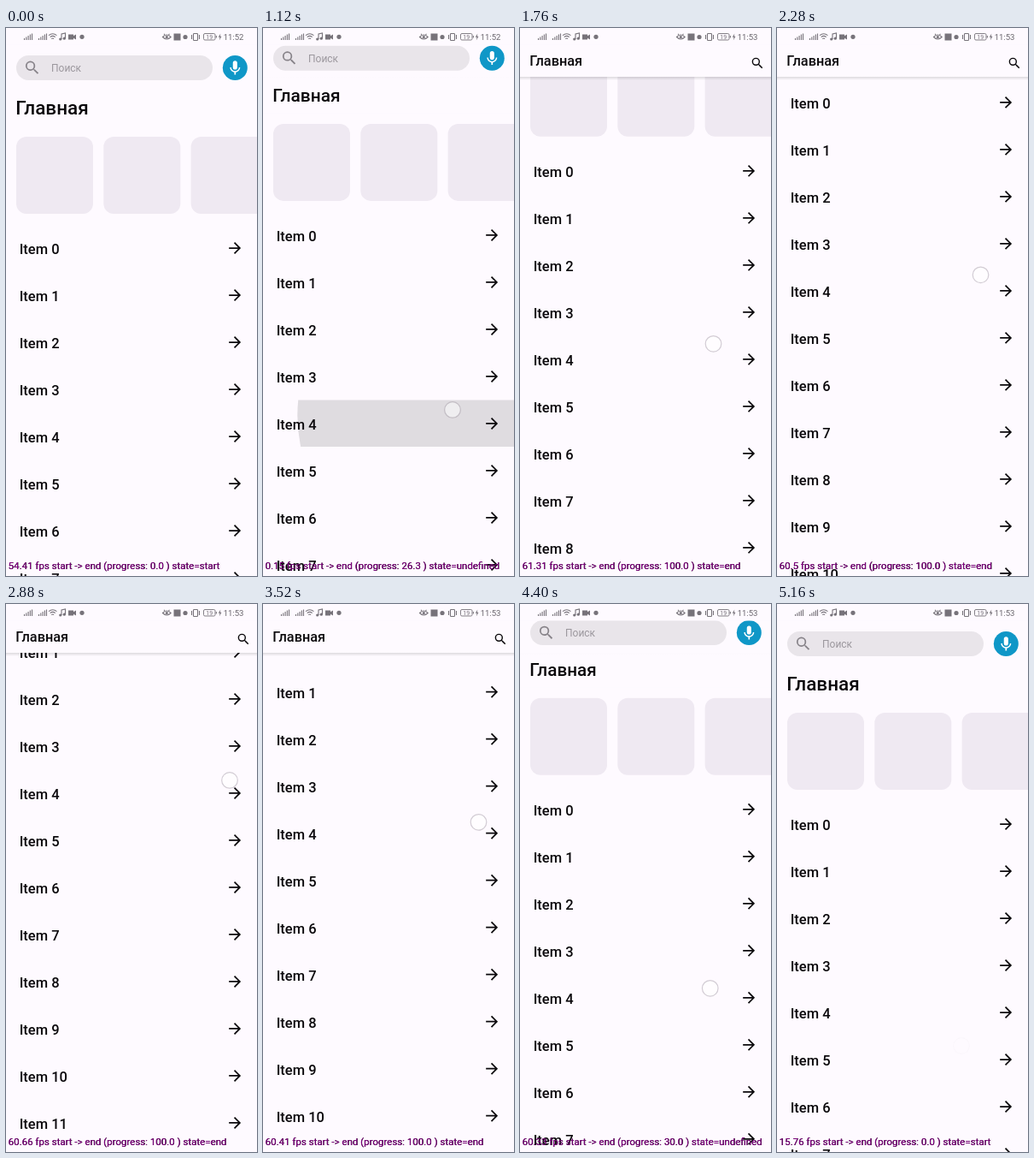
Recreate the animation shown at these times as an HTML page. Size 294 by 640 pixels, loop 5560 ms.

```html
<!DOCTYPE html>
<html lang="ru">
<head>
<meta charset="utf-8">
<style>
  html, body { margin: 0; width: 100%; height: 100%; overflow: hidden; background: #fefaff; }
  #stage { position: absolute; left: 0; top: 0; width: 294px; height: 640px; overflow: hidden; }
  svg { display: block; }
  text { font-family: Roboto, sans-serif; }
  .label { font-size: 16.5px; font-weight: 500; fill: #0b090c; }
  #title { font-size: 22.5px; font-weight: 500; fill: #0b090c; }
  #debug {
    position: absolute; left: 2.5px; top: 621px; line-height: 14px; white-space: pre;
    font: 11.5px/14px Roboto, sans-serif; color: #808; text-shadow: .3px .3px 0 #000;
  }
</style>
</head>
<body>
<div id="stage">
<svg width="294" height="640" viewBox="0 0 294 640">
  <defs>
    <path id="arrow" d="M12 4l-1.41 1.41L16.17 11H4v2h12.17l-5.58 5.59L12 20l8-8z"/>
    <path id="lens" d="M15.5 14h-.79l-.28-.27A6.47 6.47 0 0 0 16 9.5 6.5 6.5 0 1 0 9.5 16c1.61 0 3.09-.59 4.23-1.57l.27.28v.79l5 4.99L20.49 19zm-6 0a4.5 4.5 0 1 1 0-9 4.5 4.5 0 0 1 0 9z"/>
    <path id="signal" d="M.5 14v-2M2.8 14v-3.5M5.1 14V9M7.4 14V7.5M9.5 14V6.5"/>
    <clipPath id="row"><rect width="294" height="54.5"/></clipPath>
    <linearGradient id="shade" x2="0" y2="1">
      <stop stop-color="#000" stop-opacity=".13"/>
      <stop offset="1" stop-color="#000" stop-opacity="0"/>
    </linearGradient>
  </defs>

  <rect width="294" height="640" fill="#fefaff"/>
  <g id="list">
    <g fill="#efe9f2">
      <rect x="12" y="127" width="90" height="90" rx="12"/>
      <rect x="114.3" y="127" width="90" height="90" rx="12"/>
      <rect x="216.6" y="127" width="90" height="90" rx="12"/>
    </g>
    <g transform="translate(0 449.5)" clip-path="url(#row)">
      <circle id="ripple" cy="18" fill="#000"/>
    </g>
  </g>

  <rect id="header" width="294" fill="#fefaff"/>
  <rect id="shadow" y="57" width="294" height="4" fill="url(#shade)"/>
  <g id="search">
    <rect x="12" y="32" width="230" height="29" rx="14.5" fill="#e9e5ea"/>
    <use href="#lens" transform="translate(20.3 36) scale(.87)" fill="#878389"/>
    <text x="53" y="51" font-size="12" fill="#9b979d">Поиск</text>
    <circle cx="268.3" cy="46.5" r="14.5" fill="#0f97c7"/>
    <path transform="translate(258.1 36.6) scale(.85)" fill="#fff"
      d="M12 14a3 3 0 0 0 3-3V5a3 3 0 0 0-6 0v6a3 3 0 0 0 3 3zm5.3-3c0 3-2.54 5.1-5.3 5.1S6.7 14 6.7 11H5c0 3.41 2.72 6.23 6 6.72V21h2v-3.28c3.28-.48 6-3.3 6-6.72z"/>
  </g>
  <text id="title">Главная</text>
  <use id="find" href="#lens" transform="translate(269.5 32.5) scale(.72)" fill="#0b090c"/>

  <rect width="294" height="19.5" fill="#fefaff"/>
  <g fill="none" stroke="#77737a" stroke-width="1.1">
    <use href="#signal" x="21"/>
    <use href="#signal" x="38"/>
    <path d="M50 8.7q4.7-4 9.4 0M51.7 10.7q3-2.6 6 0M53.3 12.6q1.4-1.2 2.8 0"/>
    <path d="M65 13V7l4.5-1v6"/>
    <path d="M183.5 10.5q4.8-5 9.6 0q-4.8 5-9.6 0zM185 6.8l1 1M191.5 6.8l-1 1"/>
    <rect x="219.5" y="6.5" width="5" height="8" rx=".8"/>
    <path d="M217.5 8v5M226.5 8v5"/>
    <rect x="231.5" y="6.5" width="13.5" height="7.5" rx="1.5" stroke-width=".9"/>
    <path d="M246.3 9v2.6"/>
  </g>
  <g fill="#77737a">
    <circle cx="63.7" cy="13" r="1.6"/>
    <circle cx="68.3" cy="12.2" r="1.6"/>
    <path d="M73 7.5h6v1.7l3-1.7v6l-3-1.7v1.7h-6z"/>
    <circle cx="89" cy="10.3" r="2.6"/>
    <circle cx="188.3" cy="10.5" r="1.6"/>
    <rect x="196.5" y="6.5" width="8" height="8"/>
    <circle cx="210" cy="10.5" r="2.6"/>
    <path d="M251.3 6.5l-2.5 4.3h1.7l-.6 3.5 2.6-4.5h-1.7z"/>
    <text x="238.2" y="13" font-size="7" text-anchor="middle">19</text>
    <text id="clock" x="254.7" y="14" font-size="9.5" fill="#68646b"></text>
  </g>
</svg>
<div id="debug"></div>
<svg width="294" height="640" style="position:absolute;left:0;top:0">
  <circle id="touch" r="9.3" fill="#fff" fill-opacity=".5" stroke="#786e7d" stroke-opacity=".33" stroke-width="1.2"/>
</svg>
</div>

<script>
const LOOP = 5560, COLLAPSE = 57.4;
const $ = id => document.getElementById(id);
const clamp = (v, a = 0, b = 1) => Math.min(b, Math.max(a, v));
const lerp = (a, b, k) => a + (b - a) * k;
const ramp = (t, a, b) => clamp((t - a) / (b - a));

// One long drag: time, finger x, finger y, scroll
const drag = [
  [920, 222, 464, 0], [1000, 222, 461, 0], [1120, 222, 446, 15],
  [1760, 226.5, 369, 90], [2280, 238.5, 288.5, 170], [2880, 262, 206, 256],
  [3180, 264, 179, 284], [3680, 245, 301, 164], [4000, 231.5, 370.5, 96],
  [4500, 221, 466, 0], [4840, 216, 516, -50]
];

// Debug frame rate readings: time, value
const rates = [
  [0, '54.41'], [1040, '0.15'], [1280, '58.82'], [1480, '60.27'], [1680, '61.31'],
  [1880, '60.12'], [2080, '60.84'], [2240, '60.5'], [2440, '60.93'], [2640, '60.2'],
  [2840, '60.66'], [3080, '59.87'], [3320, '60.41'], [3560, '60.78'], [3760, '60.09'],
  [3960, '60.46'], [4160, '61.02'], [4360, '60.33'], [4560, '59.94'], [4840, '15.76']
];

function slope(i, c) {
  if (i < 1 || i > drag.length - 2) return 0;
  const [a, b, d] = [drag[i - 1], drag[i], drag[i + 1]];
  const m = (b[c] - a[c]) / (b[0] - a[0]), n = (d[c] - b[c]) / (d[0] - b[0]);
  return m * n > 0 ? 2 * m * n / (m + n) : 0;
}

// Monotone cubic through the drag points
function track(t, c) {
  t = clamp(t, drag[0][0], drag[drag.length - 1][0]);
  let i = 0;
  while (i < drag.length - 2 && t >= drag[i + 1][0]) i++;
  const a = drag[i], b = drag[i + 1], h = b[0] - a[0], u = (t - a[0]) / h, v = 1 - u;
  return a[c] * (1 + 2 * u) * v * v + b[c] * u * u * (3 - 2 * u)
    + h * u * v * (slope(i, c) * v - slope(i + 1, c) * u);
}

let rows = '';
for (let i = 0; i < 16; i++) {
  const y = 264 + 55 * i;
  rows += `<text class="label" x="15.7" y="${y}">Item ${i}</text>
    <use href="#arrow" transform="translate(257.7 ${y - 17.4}) scale(.87)" fill="#0b090c"/>`;
}
$('list').insertAdjacentHTML('beforeend', rows);

const set = (id, attrs) => {
  for (const k in attrs) $(id).setAttribute(k, attrs[k]);
};

function draw(t) {
  const scroll = Math.max(0, track(t, 3)), p = clamp(scroll / COLLAPSE);

  set('list', { transform: `translate(0 ${-scroll})` });
  set('ripple', {
    cx: lerp(232, 190, ramp(t, 1020, 1245)),
    r: lerp(110, 250, ramp(t, 1020, 1245)),
    opacity: t < 1020 ? 0 : .12 * (1 - ramp(t, 1180, 1400))
  });

  set('header', { height: lerp(115, 57, p) });
  set('shadow', { opacity: p === 1 ? 1 : p * p * p });
  set('search', { transform: `translate(0 ${-43 * p})` });
  set('title', { transform: `translate(11.3 ${lerp(101, 43.5, p)}) scale(${lerp(1, 16.3 / 22.5, p)})` });
  set('find', { opacity: ramp(p, .5, 1) });

  set('touch', {
    cx: track(t, 1), cy: track(t, 2),
    opacity: t < 4840 ? ramp(t, 900, 960) : lerp(1, .07, ramp(t, 4840, 5160))
  });

  $('clock').textContent = t < 1320 ? '11:52' : '11:53';
  const fps = rates.filter(r => r[0] <= t).pop()[1];
  const pct = (Math.floor(p * 1000) / 10).toFixed(1);
  const state = p === 0 ? 'start' : p === 1 ? 'end' : 'undefined';
  $('debug').textContent = `${fps} fps start -> end (progress: ${pct} ) state=${state}`;
}

const start = performance.now();
function tick() {
  draw((performance.now() - start) % LOOP);
  requestAnimationFrame(tick);
}
tick();
</script>
</body>
</html>
```
